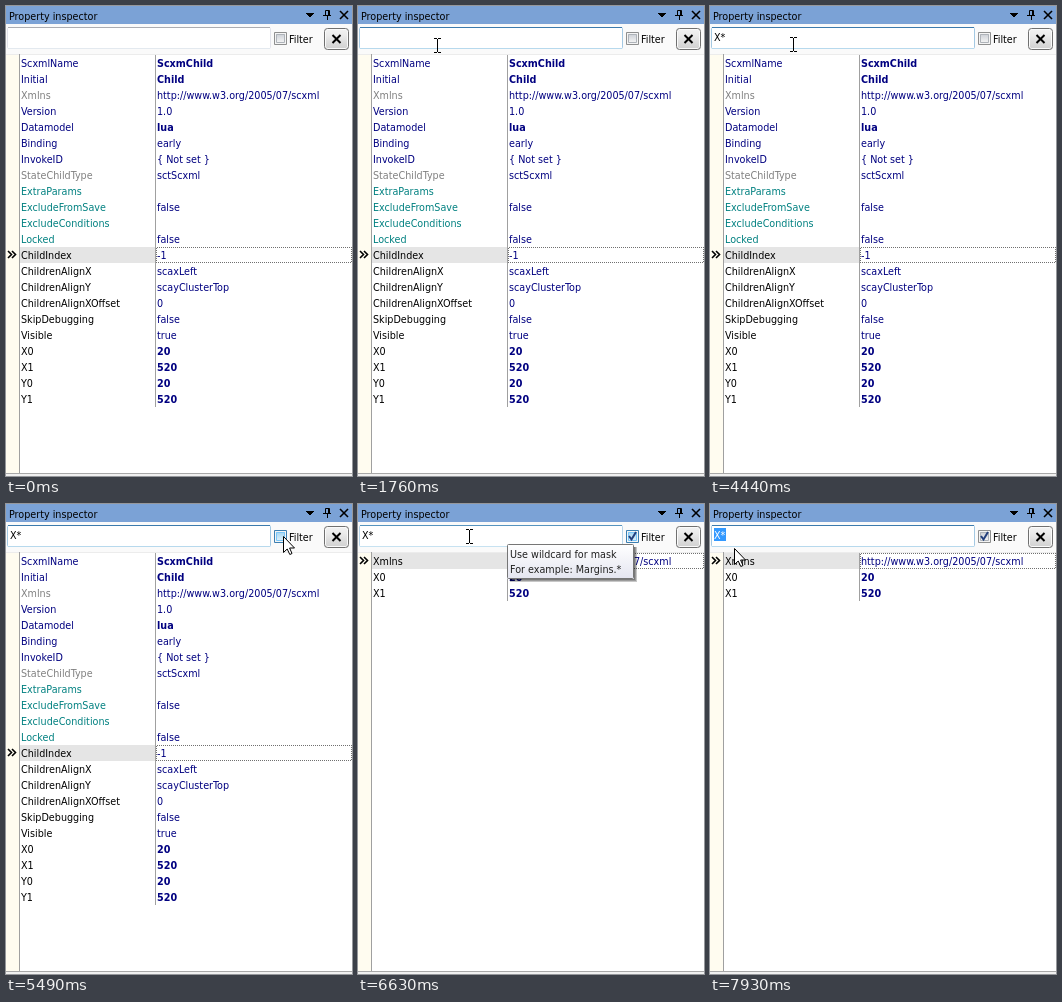
Animation of 346 by 470 pixels, one loop 8 s. Source, as an HTML page with a canvas:

```html
<!DOCTYPE html>
<html lang="en">
<head>
<meta charset="utf-8">
<title>Property inspector</title>
<style>
html, body { margin: 0; width: 100%; height: 100%; overflow: hidden; background: #fff; }
canvas { display: block; width: 346px; height: 470px; }
</style>
</head>
<body>
<canvas id="stage" width="346" height="470"></canvas>
<script>
const ctx = document.getElementById('stage').getContext('2d');
const LOOP = 8000, NAVY = '#000080', TEAL = '#008080', GRAY = '#808080', BLACK = '#000';
const FONT = '10.7px "DejaVu Sans Condensed", "DejaVu Sans", sans-serif';

// colour of the names, then "name=value" rows; a leading ! makes the value bold
const GROUPS = [
  [NAVY, 'ScxmlName=!ScxmChild', 'Initial=!Child'],
  [GRAY, 'Xmlns=http://www.w3.org/2005/07/scxml'],
  [NAVY, 'Version=1.0', 'Datamodel=!lua', 'Binding=early', 'InvokeID={ Not set }'],
  [GRAY, 'StateChildType=sctScxml'],
  [TEAL, 'ExtraParams=', 'ExcludeFromSave=false', 'ExcludeConditions=', 'Locked=false'],
  [BLACK, 'ChildIndex=-1', 'ChildrenAlignX=scaxLeft', 'ChildrenAlignY=scayClusterTop',
    'ChildrenAlignXOffset=0', 'SkipDebugging=false', 'Visible=true',
    'X0=!20', 'X1=!520', 'Y0=!20', 'Y1=!520']
];
const ROWS = GROUPS.flatMap(([color, ...rows]) => rows.map(row => {
  const [name, value] = row.split('=');
  return { name, color, value: value.replace('!', ''), bold: value[0] === '!' };
}));

// what the user does, in ms
const ARRIVE = 70, CLICK = 1230, TYPE_X = 2700, TYPE_STAR = 3580;
const CHECK = 5620, FILTER = 5760, DRAG = 7180, DROP = 7400, BLINK = 530;

// pointer moves: start, end and place reached; it rests in between
const MOVES = [
  [240, 630, 105, 0], [630, 1000, 79, 40],
  [4400, 4800, 205, 0], [4800, 5140, 304, 64], [5140, 5420, 277, 32],
  [6470, 6630, 111, 33], [6630, 6980, 47, 31],
  [DRAG, 7460, 4, 26], [7640, 7730, 24, 44]
];

// hints: start, end and corner
const HINTS = [
  [1070, CLICK + 30, 77, 47], [2490, TYPE_X, 77, 47],
  [6530, DRAG, 149, 40], [7660, 7725, 46, 44]
];

const within = (t, a, b) => t >= a && t < b;
const clamp = v => Math.max(0, Math.min(1, v));
const ease = k => k * k * (3 - 2 * k);

function box(x, y, w, h, fill) {
  ctx.fillStyle = fill;
  ctx.fillRect(x, y, w, h);
}

function frame(x, y, w, h, color, r = 0) {
  ctx.strokeStyle = color;
  ctx.lineWidth = 1;
  ctx.beginPath();
  ctx.roundRect(x + .5, y + .5, w - 1, h - 1, r);
  ctx.stroke();
}

function shade(y, h, ...colors) {
  const g = ctx.createLinearGradient(0, y, 0, y + h);
  colors.forEach((c, i) => g.addColorStop(i / (colors.length - 1), c));
  return g;
}

function text(s, x, y, color = BLACK, bold = false) {
  ctx.font = (bold ? 'bold ' : '') + FONT;
  ctx.fillStyle = color;
  ctx.fillText(s, x, y);
}

function line(points, color, width, fill) {
  ctx.beginPath();
  points.forEach(p => ctx.lineTo(...p));
  if (fill) {
    ctx.closePath();
    ctx.fillStyle = fill;
    ctx.fill();
  }
  ctx.strokeStyle = color;
  ctx.lineWidth = width;
  ctx.stroke();
}

function cross(x, y, size, width) {
  line([[x, y], [x + size, y + size]], BLACK, width);
  line([[x + size, y], [x, y + size]], BLACK, width);
}

function titleBar() {
  box(0, 0, 346, 18, '#7ba2d6');
  text('Property inspector', 3, 14);
  for (let i = 0; i < 4; i++) box(300 + i, 7 + i, 8 - 2 * i, 1, BLACK);
  frame(319, 4, 5, 6, BLACK);
  box(322, 4, 1, 6, BLACK);
  box(317, 9, 8, 1, BLACK);
  box(321, 10, 1, 4, BLACK);
  cross(334, 5, 8, 1.6);
}

function field(t, hover) {
  const focus = within(t, CLICK, CHECK) || t >= DRAG;
  const [top, side, bottom] = focus ? ['#3d7bad', '#a4c9e3', '#b7d9ed']
    : hover ? ['#5794bf', '#b7d5ea', '#c7e2f1'] : ['#abadb3', '#e2e3ea', '#e3e9ef'];
  box(1, 21, 264, 22, '#fff');
  frame(1, 21, 264, 22, side, 1);
  box(2, 21, 262, 1, top);
  box(2, 42, 262, 1, bottom);

  const typed = t < TYPE_X ? '' : t < TYPE_STAR ? 'X' : 'X*';
  const selected = t >= DROP;
  if (selected) box(4, 24, 12, 13, '#3399ff');
  text(typed, 4, 35, selected ? '#fff' : BLACK);

  // the caret restarts its blink at every action
  const start = [DROP, TYPE_STAR, TYPE_X, CLICK].find(a => t >= a);
  if (focus && Math.floor((t - start) / BLINK) % 2 === 0)
    box(selected ? 4 : 4 + 6 * typed.length, 24, 1, 13, selected ? '#cc6600' : BLACK);
}

function checkBox(t) {
  const [outer, inner, from, to] = within(t, CHECK, CHECK + 70)
    ? ['#3c7fb1', '#5e9cc2', '#7fb9dc', '#c4e5f6']
    : within(t, 5340, 6650) ? ['#3c7fb1', '#79c6f9', '#a5d5f0', '#dff2fc']
    : ['#8e8f8f', '#aeb3b9', '#cbcfd5', '#f6f6f6'];
  box(268, 26, 13, 13, '#f4f4f4');
  frame(268, 26, 13, 13, outer);
  box(270, 28, 9, 9, shade(28, 9, from, to));
  frame(270, 28, 9, 9, inner);
  if (t >= CHECK + 70) line([[271, 32], [273.5, 35.5], [278, 28]], '#233f7c', 2);
  text('Filter', 283, 37);
}

function button() {
  box(319, 23, 23, 20, shade(22, 22, '#f3f3f3', '#ebebeb', '#dcdcdc', '#cfcfcf'));
  frame(319, 23, 23, 20, '#fafafa', 2);
  frame(318, 22, 25, 22, '#707070', 3);
  cross(326.5, 29, 8, 1.9);
}

function focusRect(x, y, w, h) {
  for (let i = 0; i < w; i++)
    for (let j = 0; j < h; j++) {
      const edge = !i || !j || i === w - 1 || j === h - 1;
      if (edge && (x + i + y + j) % 2 === 0) box(x + i, y + j, 1, 1, '#707070');
    }
}

function grid(filtered) {
  const rows = filtered ? ROWS.filter(r => r.name[0] === 'X') : ROWS;
  const current = filtered ? 0 : 12, top = 49 + 16 * current;
  box(0, 48, 346, 419, '#fff');
  box(0, 48, 13, 419, '#fffcf0');
  box(0, 48, 346, 1, '#ececec');
  box(13, 48, 1, 419, '#a0a0a0');
  box(0, 467, 346, 1, '#a8a8a8');
  box(14, top, 135, 16, '#e5e5e5');
  box(149, 49, 1, 16 * rows.length, '#a0a0a0');
  focusRect(150, top, 196, 16);
  rows.forEach(({ name, value, color, bold }, i) => {
    const y = 61 + 16 * i;
    text(name, 15, y, i === current ? BLACK : filtered ? BLACK : color);
    text(value, 151, y, NAVY, bold);
  });
  for (const x of [2, 6])
    line([[x, top + 4], [x + 3.5, top + 7.5], [x, top + 11]], BLACK, 1.6);
}

function hint(t) {
  const shown = HINTS.find(([start, end]) => within(t, start, end));
  if (!shown) return;
  const [start, , x, y] = shown;
  ctx.globalAlpha = clamp((t - start + 30) / 120);
  for (let i = 1; i < 4; i++) box(x + 3, y + 3, 124 + i, 32 + i, 'rgba(0,0,0,.22)');
  box(x, y, 127, 35, shade(y, 35, '#fff', '#e4e5f0'));
  frame(x, y, 127, 35, '#767676', 1);
  text('Use wildcard for mask', x + 3, y + 14, '#202020');
  text('For example: Margins.*', x + 3, y + 29, '#202020');
  ctx.globalAlpha = 1;
}

function pointerAt(t) {
  let x = 214, y = 134;
  for (const [start, end, toX, toY] of MOVES) {
    const k = ease(clamp((t - start) / (end - start)));
    x += (toX - x) * k;
    y += (toY - y) * k;
  }
  return [Math.round(x), Math.round(y)];
}

function pointer(x, y, beam) {
  ctx.save();
  ctx.translate(x, y);
  if (beam) {
    for (const s of [-8, 6]) {
      box(-3, s, 3, 1, BLACK);
      box(1, s, 3, 1, BLACK);
    }
    box(0, -7, 1, 13, BLACK);
  } else {
    line([[.5, .5], [.5, 16.5], [4.2, 13], [6.8, 18.5], [9, 17.5], [6.6, 12], [11.5, 12]],
      BLACK, 1, '#fff');
  }
  ctx.restore();
}

function draw(now) {
  const t = now % LOOP, [x, y] = pointerAt(t);
  const inField = x < 265 && y > 20 && y < 43;
  box(0, 0, 346, 470, '#f0f0f0');
  box(0, 18, 346, 30, '#fafafa');
  titleBar();
  field(t, inField);
  checkBox(t);
  button();
  grid(t >= FILTER);
  hint(t);
  if (t >= ARRIVE) pointer(x, y, inField);
  requestAnimationFrame(draw);
}
requestAnimationFrame(draw);
</script>
</body>
</html>
```
